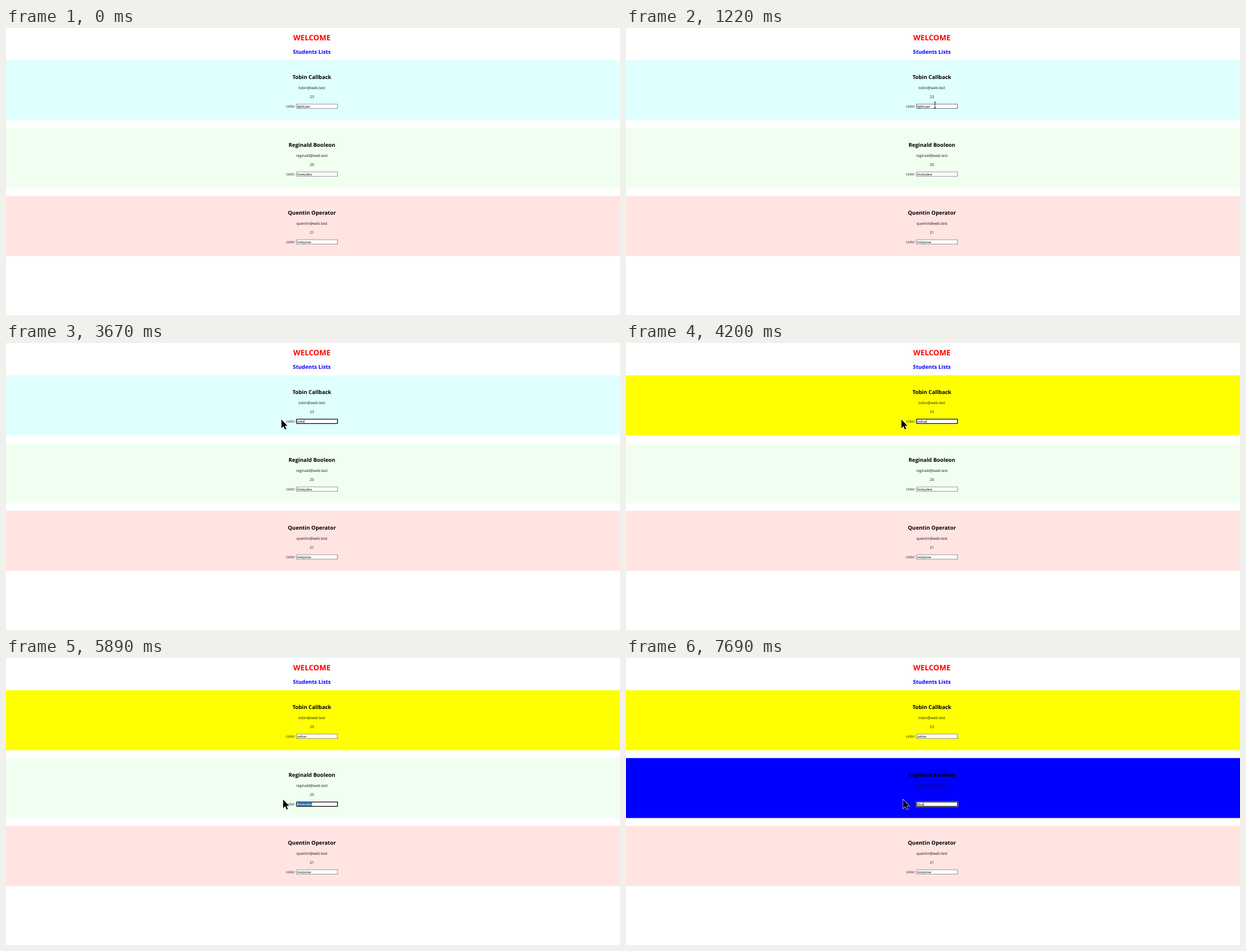
These frames come from a looping animation (1093x512 px, 8000 ms). An HTML page with a canvas:

```html
<!DOCTYPE html>
<html lang="en">
<head>
<meta charset="utf-8">
<title>Students Lists</title>
<style>
html, body { margin: 0; width: 100%; height: 100%; overflow: hidden; background: #fff; }
canvas { display: block; }
</style>
</head>
<body>
<canvas id="stage" width="1093" height="512"></canvas>
<script>
const ctx = document.getElementById('stage').getContext('2d');
const LOOP = 8000, CENTER = 544.5, PITCH = 121;
const SANS = '"Open Sans", "Noto Sans", sans-serif';
const FIELD_FONT = '5.73px "Liberation Sans", Arial, sans-serif';
const FIELD = { x: 517, y: 135.4, w: 73.5, h: 8.7 };
const TEXT_X = 518.8;

const students = [
  { name: 'Tobin Callback', mail: 'tobin@web.test', age: 23, color: 'lightcyan',
    focus: [1420, 5680], typed: 'yellow', keys: [2750, 2830, 3350, 3470, 3670, 4200] },
  { name: 'Reginald Booleon', mail: 'reginald@web.test', age: 20, color: 'honeydew',
    focus: [5680, LOOP], typed: 'blue', keys: [6900, 6960, 7290, 7690] },
  { name: 'Quentin Operator', mail: 'quentin@web.test', age: 21, color: 'mistyrose',
    focus: [LOOP, LOOP], typed: '', keys: [] }
];

// Pointer moves: time span, number of steps, waypoints
const moves = [
  { from: 70, to: 870, steps: 13, path: [[1105, 528], [860, 330], [640, 185], [557, 128], [553, 132]] },
  { from: 1000, to: 1220, steps: 4, path: [[553, 132], [550, 137.5]] },
  { from: 1420, to: 1620, steps: 4, drag: true, path: [[550, 137.5], [521, 136], [484, 134], [490, 136]] },
  { from: 4800, to: 5550, steps: 12, path: [[490, 136], [496, 131], [535, 200], [553, 257], [548, 261]] },
  { from: 5680, to: 5890, steps: 4, drag: true, path: [[548, 261], [522, 259], [486, 253], [493, 252]] }
];

function along(path, u) {
  const s = u * (path.length - 1);
  const i = Math.min(Math.floor(s), path.length - 2);
  const [a, b] = [path[i], path[i + 1]];
  return a.map((v, k) => v + (b[k] - v) * (s - i));
}

const inField = (x, y, top) =>
  x >= FIELD.x && x <= FIELD.x + FIELD.w && y >= top && y <= top + FIELD.h;

function pointerAt(t) {
  const move = moves.filter(m => t >= m.from).pop();
  if (!move) return null;
  const span = (t - move.from) / (move.to - move.from);
  const step = Math.min(move.steps, Math.floor(span * (move.steps - 1) + 1e-6) + 1);
  const u = step / move.steps;
  const [x, y] = along(move.path, u);
  const dragging = Boolean(move.drag) && u < 1;
  const beam = dragging || students.some((s, i) => inField(x, y, FIELD.y + i * PITCH));
  return { x, y, dragging, beam };
}

function label(text, x, y, font, color, align = 'center') {
  ctx.font = font;
  ctx.fillStyle = color;
  ctx.textAlign = align;
  ctx.fillText(text, x, y);
}

function box(x, y, w, h, r, color) {
  ctx.fillStyle = color;
  ctx.beginPath();
  ctx.roundRect(x, y, w, h, r);
  ctx.fill();
}

function widthOf(text) {
  ctx.font = FIELD_FONT;
  return ctx.measureText(text).width;
}

function selectionStart(text, pointer) {
  if (!pointer.dragging) return 0;
  let i = 0;
  while (i < text.length && TEXT_X + widthOf(text.slice(0, i + 1)) < pointer.x) i++;
  return i;
}

function drawField(s, dy, value, focused, selecting, pointer) {
  const { x, w, h } = FIELD, y = FIELD.y + dy;
  if (focused) {
    box(x - 0.8, y - 0.6, w + 1.6, h + 1.3, 1.6, '#fff');
    box(x - 0.3, y - 0.1, w + 0.6, h + 0.3, 1.1, '#000');
    box(x + 1, y + 1.1, w - 2, h - 2.2, 0.3, '#fff');
  } else {
    const hover = pointer && inField(pointer.x, pointer.y, y);
    box(x, y, w, h, 0.7, hover ? '#444' : '#767676');
    box(x + 0.9, y + 0.9, w - 1.8, h - 1.8, 0.2, '#fff');
  }
  const base = 141.6 + dy;
  label(value, TEXT_X, base, FIELD_FONT, '#111', 'left');
  if (!focused) return;
  const end = TEXT_X + widthOf(value);
  if (selecting) {
    const first = selectionStart(value, pointer);
    const left = TEXT_X + widthOf(value.slice(0, first));
    box(left, y + 1.4, end - left, h - 2.6, 0, '#0078d7');
    label(value.slice(first), left, base, FIELD_FONT, '#fff', 'left');
  } else {
    box(end, y + 1.3, 0.6, h - 2.6, 0, '#111');
  }
}

function drawStudent(s, i, t, pointer) {
  const dy = i * PITCH;
  const count = s.keys.filter(k => t >= k).length;
  const value = count ? s.typed.slice(0, count) : s.color;
  const done = count && count === s.typed.length;
  const focused = t >= s.focus[0] && t < s.focus[1];
  box(0, 57.4 + dy, 1093, 107.2, 0, done ? s.typed : s.color);
  label(s.name, CENTER, 90.6 + dy, `bold 9.6px ${SANS}`, '#000');
  const small = `6.5px ${SANS}`;
  label(s.mail, CENTER, 109.3 + dy, small, '#111');
  label(s.age, CENTER, 125.4 + dy, small, '#111');
  label('color:', 498.4, 141.7 + dy, small, '#111', 'left');
  drawField(s, dy, value, focused, !count, pointer);
}

function drawPointer({ x, y, beam }) {
  ctx.save();
  ctx.translate(x, y);
  if (beam) {
    ctx.strokeStyle = '#111';
    ctx.lineWidth = 0.9;
    ctx.beginPath();
    for (const e of [-5.2, 5.2]) {
      ctx.moveTo(-2, e);
      ctx.lineTo(2, e);
    }
    ctx.moveTo(0, -5.2);
    ctx.lineTo(0, 5.2);
    ctx.stroke();
  } else {
    const tip = new Path2D('M.3 .5V16L3.9 12.6L6.5 18.2L8.9 17.1L6.3 11.7H11Z');
    ctx.lineWidth = 1.2;
    ctx.strokeStyle = '#fff';
    ctx.stroke(tip);
    ctx.fillStyle = '#000';
    ctx.fill(tip);
  }
  ctx.restore();
}

function draw(t) {
  const pointer = pointerAt(t);
  ctx.textRendering = 'geometricPrecision';
  box(0, 0, 1093, 512, 0, '#fff');
  label('WELCOME', CENTER, 22.3, `bold 13.3px ${SANS}`, 'red');
  label('Students Lists', CENTER, 45.8, `bold 9.6px ${SANS}`, 'blue');
  students.forEach((s, i) => drawStudent(s, i, t, pointer));
  if (pointer) drawPointer(pointer);
}

const start = performance.now();
function tick() {
  draw((performance.now() - start) % LOOP);
  requestAnimationFrame(tick);
}
tick();
</script>
</body>
</html>
```
